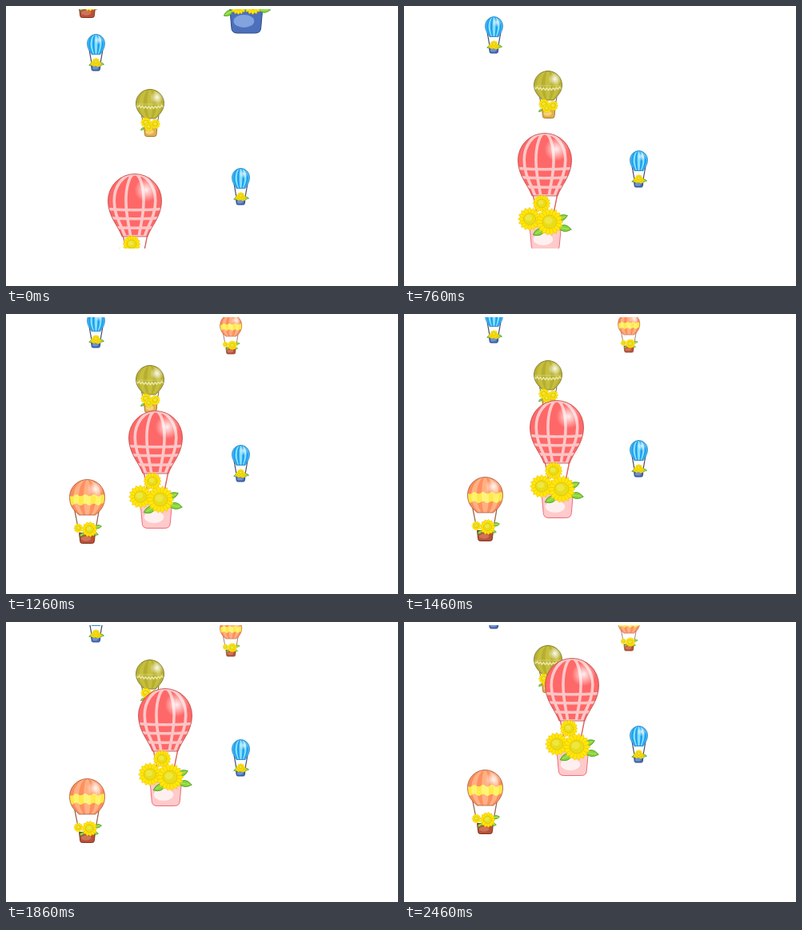
Write an HTML page with a canvas that moves like this. It is 490x351 px and loops after 2560 ms.

```html
<!DOCTYPE html>
<html lang="en">
<head>
<meta charset="utf-8">
<title>Balloons</title>
<style>
html, body { margin: 0; width: 100%; height: 100%; overflow: hidden; background: #fff; }
canvas { display: block; }
</style>
</head>
<body>
<canvas id="c" width="490" height="351"></canvas>
<script>
const ctx = document.getElementById('c').getContext('2d');
const LOOP = 2560, FIRST = 60, STEP = 100, CUT = 11;

function paint(fill, stroke, width = 1) {
  if (fill) { ctx.fillStyle = fill; ctx.fill(); }
  if (stroke) { ctx.strokeStyle = stroke; ctx.lineWidth = width; ctx.stroke(); }
}

function oval(x, y, rx, ry, fill, stroke, width) {
  ctx.beginPath();
  ctx.ellipse(x, y, rx, ry, 0, 0, Math.PI * 2);
  paint(fill, stroke, width);
}

function line(x1, y1, x2, y2, color, width = 1) {
  ctx.beginPath();
  ctx.moveTo(x1, y1);
  ctx.lineTo(x2, y2);
  paint(null, color, width);
}

// Envelope outline, squeezed sideways by f to give a pair of meridians
function envelope(e, f = 1) {
  const { r, ry = r, neck, h, bulge = .13 } = e;
  const low = h - (h - ry) * .29, high = ry + (h - ry) * .45, side = neck + r * bulge;
  ctx.save();
  ctx.translate(r, 0);
  ctx.scale(f, 1);
  ctx.beginPath();
  ctx.moveTo(-neck, h);
  ctx.bezierCurveTo(-side, low, -r, high, -r, ry);
  ctx.ellipse(0, ry, r, ry, 0, Math.PI, 0);
  ctx.bezierCurveTo(r, high, side, low, neck, h);
  ctx.closePath();
  ctx.restore();
}

function inside(e, draw) {
  ctx.save();
  envelope(e);
  ctx.clip();
  draw();
  ctx.restore();
}

function gores(e, list) {
  for (const [f, color] of list) {
    envelope(e, f);
    paint(color);
  }
}

function shine(x, y, r, alpha = .9) {
  const g = ctx.createRadialGradient(x, y, 0, x, y, r);
  g.addColorStop(0, `rgba(255,255,255,${alpha})`);
  g.addColorStop(.4, `rgba(255,255,255,${alpha * .6})`);
  g.addColorStop(1, 'rgba(255,255,255,0)');
  oval(x, y, r, r, g);
}

function flower(x, y, r, n = 16) {
  ctx.beginPath();
  for (let i = 0; i < n * 2; i++) {
    const a = i * Math.PI / n, d = i % 2 ? r * .82 : r;
    ctx.lineTo(x + d * Math.cos(a), y + d * Math.sin(a));
  }
  ctx.closePath();
  paint('#ffe80a', '#ecc808', .7);
  if (r > 7) {
    for (let i = 0; i < n; i++) {
      const a = (i + .5) * 2 * Math.PI / n, c = Math.cos(a), s = Math.sin(a);
      line(x + r * .55 * c, y + r * .55 * s, x + r * .82 * c, y + r * .82 * s, '#f8c400', .8);
    }
  }
  oval(x, y, r * .53, r * .5, '#e8dd18', '#dcbc0a', .7);
  oval(x - r * .08, y - r * .1, r * .3, r * .26, '#efe640');
}

function leaf(x, y, len, angle) {
  ctx.save();
  ctx.translate(x, y);
  ctx.rotate(angle);
  ctx.beginPath();
  ctx.moveTo(0, 0);
  ctx.quadraticCurveTo(len * .45, -len * .5, len, 0);
  ctx.quadraticCurveTo(len * .45, len * .45, 0, 0);
  paint('#86d43a', '#4d9a24', .8);
  line(0, 0, len * .8, 0, '#c6ee6c', .7);
  ctx.restore();
}

function basket(x1, x2, y1, y2, fill, stroke, light) {
  const w = x2 - x1, h = y2 - y1, k = w * .055, q = h * .22;
  ctx.beginPath();
  ctx.moveTo(x1, y1);
  ctx.lineTo(x2, y1);
  ctx.lineTo(x2 - k, y2 - q);
  ctx.quadraticCurveTo(x2 - k, y2, x2 - k - q, y2);
  ctx.lineTo(x1 + k + q, y2);
  ctx.quadraticCurveTo(x1 + k, y2, x1 + k, y2 - q);
  ctx.closePath();
  paint(fill, stroke);
  oval(x1 + w * .43, y1 + h * .55, w * .31, h * .24, light);
}

function red() {
  const e = { r: 33.5, neck: 16, h: 78.5 };
  line(19, 78, 23, 98, '#dc6262', 1.4);
  line(49, 78, 45, 98, '#dc6262', 1.4);
  envelope(e);
  paint('#ff6868');
  inside(e, () => {
    for (const f of [.33, .77]) {
      envelope(e, f);
      paint(null, '#ffc8c8', 3.6);
    }
    for (const y of [44.5, 55.5, 67]) {
      ctx.beginPath();
      ctx.moveTo(0, y - .5);
      ctx.quadraticCurveTo(33.5, y + 2, 67, y - .5);
      paint(null, '#ffc4c4', 3.4);
    }
    shine(48, 20, 15);
  });
  envelope(e);
  paint(null, '#b94a4a', .8);
  basket(14.5, 54, 116, 147, '#ffcaca', '#ed6c7c', '#fff0f0');
  leaf(48, 109, 15, -.4);
  leaf(50, 118, 17, .15);
  leaf(34, 120, 17, 2.7);
  flower(29.5, 88, 11);
  flower(14.5, 107.5, 14.5);
  flower(39.5, 111, 17, 18);
}

function green() {
  const e = { r: 17.5, neck: 7, h: 36.5, bulge: .3 };
  line(7, 33, 10.5, 48, '#706338');
  line(28.5, 33, 25.5, 48, '#706338');
  gores(e, [[1, '#b8b034'], [.78, '#c6bf3e'], [.48, '#b6ae30'], [.2, '#c6bf3e']]);
  inside(e, () => {
    ctx.beginPath();
    for (let x = 0; x <= 36; x += 2) ctx.lineTo(x, 19.5 + (x % 4 ? 2.5 : 0) + 2 * Math.sin(x * Math.PI / 36));
    paint(null, '#ece8a8', 1.4);
    line(1, 18.5, 34, 18.5, '#d8d27c', .8);
    shine(26, 10, 8.5);
  });
  envelope(e);
  paint(null, '#787026', .8);
  basket(10, 26.5, 46, 59, '#e2b04c', '#a87a2c', '#f4d27c');
  leaf(10, 48, 5, 2.5);
  flower(12.5, 41.5, 6.5, 10);
  flower(24, 43.5, 6, 10);
  flower(16, 47, 5.5, 10);
}

function blue() {
  const e = { r: 11, ry: 11.5, neck: 5.5, h: 25, bulge: .2 };
  line(2.5, 19, 6, 39, '#42486a', 1.2);
  line(19.5, 19, 16, 39, '#42486a', 1.2);
  gores(e, [[1, '#4cc4fa'], [.86, '#1f9fee'], [.64, '#84e0ff'], [.42, '#1f9fee'], [.17, '#84e0ff']]);
  inside(e, () => shine(14.5, 7, 6, .8));
  envelope(e);
  paint(null, '#2a7fbe', .8);
  basket(5, 16.5, 38, 45.5, '#4670bd', '#2c4781', '#6f92d4');
  leaf(7, 37, 5, 2.8);
  leaf(15, 37, 6, .1);
  flower(8.5, 36.5, 4, 8);
  flower(13.5, 37, 4, 8);
  flower(11, 34.5, 4.5, 8);
}

function orange() {
  const e = { r: 22, neck: 10, h: 44.5, bulge: .36 };
  const band = [[1, '#ffe648'], [.78, '#fff36c'], [.48, '#ffea4c'], [.2, '#fff47a']];
  line(6, 37, 10.5, 60, '#97604a', 1.3);
  line(37, 37, 33, 60, '#97604a', 1.3);
  gores(e, [[1, '#fa8c5c'], [.78, '#ffb184'], [.48, '#ff8f60'], [.2, '#ffb184']]);
  inside(e, () => {
    ctx.beginPath();
    for (let x = 0; x <= 44; x += 2) ctx.lineTo(x, 20 + 1.3 * Math.sin(x * .57));
    for (let x = 44; x >= 0; x -= 2) ctx.lineTo(x, 31 + 1.3 * Math.sin(x * .57));
    ctx.closePath();
    ctx.clip();
    gores(e, band);
  });
  inside(e, () => shine(32, 12, 10));
  envelope(e);
  paint(null, '#a85a3a', .8);
  basket(12, 32, 67, 80, '#b85238', '#823321', '#cf745a');
  leaf(31, 60, 9, -.15);
  leaf(29, 67, 7, .3);
  leaf(18, 67, 7, 2.5);
  flower(11, 61, 5.5, 10);
  flower(25, 62.5, 9.5, 13);
}

// Lower part of a large blue balloon leaving through the top
function bigBasket() {
  basket(7, 48.5, 0, 33.5, '#4c70bb', '#304c8b', '#83a3df');
  leaf(11, 5, 13, 2.6);
  leaf(44, 5, 14, -.05);
  flower(18, -1, 11);
  flower(36, -2, 12);
}

// Half a pixel of offset keeps the outlines crisp
function put(draw, x, y, scale = 1) {
  ctx.save();
  ctx.translate(Math.round(x) + .5, Math.round(y) + .5);
  ctx.scale(scale, scale);
  draw();
  ctx.restore();
}

function render(now) {
  const t = now % LOOP;
  const k = t < FIRST ? 0 : Math.floor((t - FIRST) / STEP) + 1;
  const late = k >= CUT;
  const s = late ? k + 1 : k;

  ctx.fillStyle = '#fff';
  ctx.fillRect(0, 0, 490, 351);
  ctx.save();
  ctx.beginPath();
  ctx.rect(0, 4, 490, 300);
  ctx.clip();
  put(blue, 101, 35.2 - 2.82 * s);
  put(blue, 282, 203.2 - 2.81 * s);
  put(green, 162, 104.2 - 2.88 * s);
  if (late) {
    put(orange, 79, 207.4 - 1.9 * (s - 14));
    put(orange, 267, -.2 - 1.15 * (s - 14), .62);
  } else {
    put(orange, 79, -66 - 1.88 * s);
    put(bigBasket, 272 + 4.5 * s, -6 * s);
  }
  put(red, 126.8 + 1.9 * s, 210.4 - 6.38 * s);
  ctx.restore();
}

const start = performance.now();
function tick() {
  render(performance.now() - start);
  requestAnimationFrame(tick);
}
tick();
</script>
</body>
</html>
```
